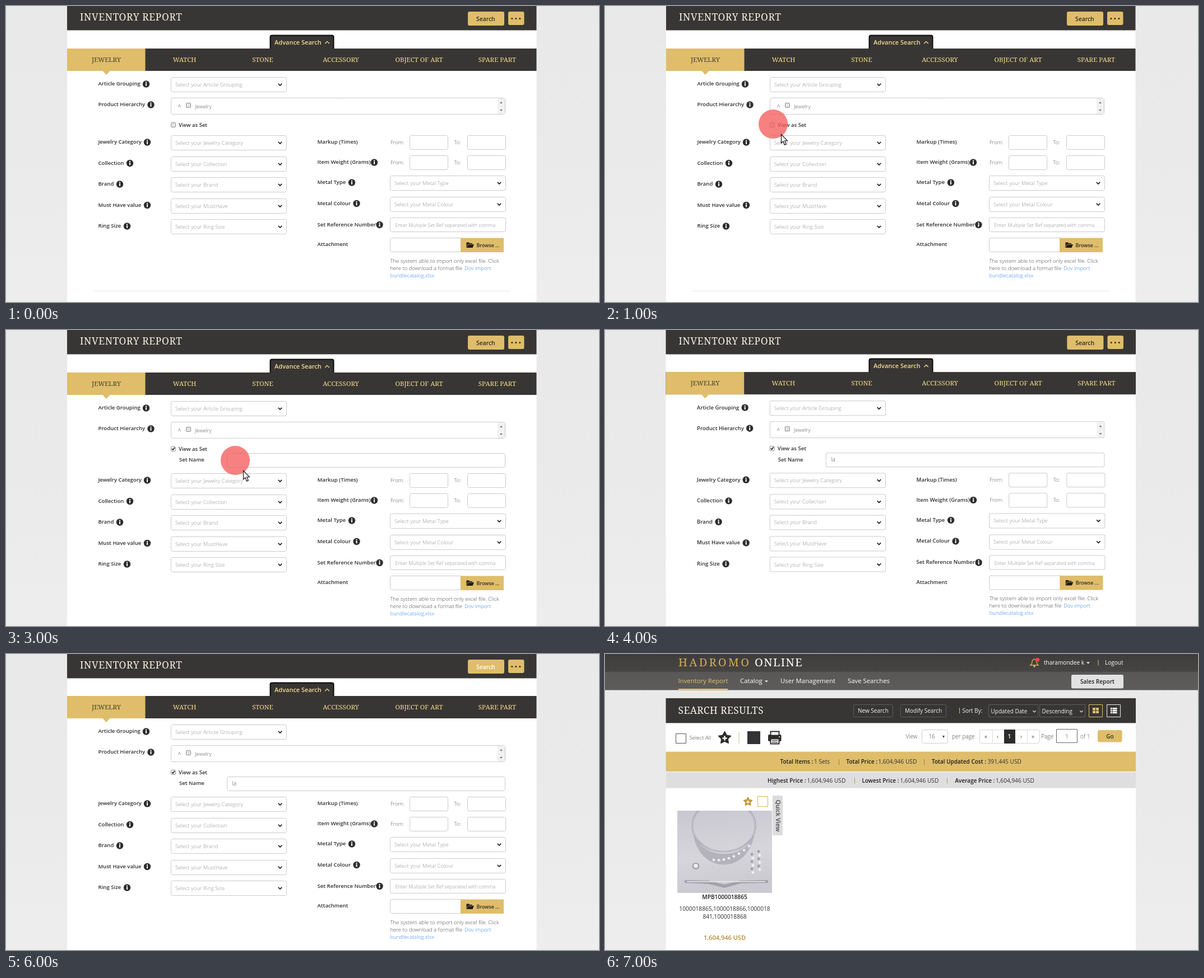
Animation of 1058x529 px, one loop 8000 ms. Source, as an HTML page with a canvas:

```html
<!DOCTYPE html>
<html lang="en">
<head>
<meta charset="utf-8">
<title>Inventory report</title>
<style>
html, body { margin: 0; width: 100%; height: 100%; overflow: hidden; background: #ebebeb; }
canvas { display: block; width: 1058px; height: 529px; }
</style>
</head>
<body>
<canvas id="stage" width="1058" height="529"></canvas>
<script>
const ctx = document.getElementById('stage').getContext('2d');
const W = 1058, H = 529, LOOP = 8000;
const GOLD = '#dfbd6a', DARK = '#383634', PALE = '#f8dc90', INK = '#2f2f2f';
const SANS = '"Open Sans", sans-serif', SERIF = '"Noto Serif", serif';

function rect(x, y, w, h, color) {
  ctx.fillStyle = color;
  ctx.fillRect(x, y, w, h);
}

function box(x, y, w, h, { fill, line, r = 0, lw = 1 }) {
  const inset = line ? .5 : 0;
  ctx.beginPath();
  ctx.roundRect(x + inset, y + inset, w - inset * 2, h - inset * 2, r);
  if (fill) { ctx.fillStyle = fill; ctx.fill(); }
  if (line) { ctx.strokeStyle = line; ctx.lineWidth = lw; ctx.stroke(); }
}

function text(str, x, y, { size = 9.6, weight = 400, color = INK, align = 'left', font = SANS, gap = 0 } = {}) {
  ctx.font = `${weight} ${size}px ${font}`;
  ctx.letterSpacing = gap + 'px';
  ctx.textAlign = align;
  ctx.fillStyle = color;
  ctx.fillText(str, x, y);
}

function disc(x, y, r, color) {
  ctx.fillStyle = color;
  ctx.beginPath();
  ctx.arc(x, y, r, 0, Math.PI * 2);
  ctx.fill();
}

function path(points, { fill, line, lw = 1, close = true }) {
  ctx.beginPath();
  points.forEach(([x, y]) => ctx.lineTo(x, y));
  if (close) ctx.closePath();
  if (fill) { ctx.fillStyle = fill; ctx.fill(); }
  if (line) { ctx.strokeStyle = line; ctx.lineWidth = lw; ctx.stroke(); }
}

function chevron(x, y, s, dir, color, lw = 1.6) {
  path([[x - s, y - dir * s / 2], [x, y + dir * s / 2], [x + s, y - dir * s / 2]], { line: color, lw, close: false });
}

function triangle(x, y, w, h, color) {
  path([[x - w, y], [x + w, y], [x, y + h]], { fill: color });
}

function star(x, y, r, color) {
  const pts = [];
  for (let i = 0; i < 10; i++) {
    const a = i * Math.PI / 5 - Math.PI / 2, d = i % 2 ? r * .52 : r;
    pts.push([x + d * Math.cos(a), y + d * Math.sin(a)]);
  }
  ctx.lineJoin = 'round';
  path(pts, { fill: color, line: color, lw: 1.5 });
  ctx.lineJoin = 'miter';
  const p = r * .36, t = r * .2;
  rect(x - p, y + .5 - t / 2, p * 2, t, '#fff');
  rect(x - t / 2, y + .5 - p, t, p * 2, '#fff');
}

function backdrop() {
  const g = ctx.createLinearGradient(0, 0, 0, H);
  g.addColorStop(0, '#e9e9e9');
  g.addColorStop(.5, '#eaeaea');
  g.addColorStop(1, '#ededed');
  rect(0, 0, W, H, g);
}

// ---- search form ----

function label(str, x, y, infoX) {
  text(str, x, y + 3.4, { weight: 600 });
  if (!infoX) return;
  disc(infoX, y + .5, 6.2, '#2f2e2d');
  rect(infoX - 1, y - .8, 2, 4.6, '#fff');
  disc(infoX, y - 2.5, 1.15, '#fff');
}

function field(x, y, w, h) {
  box(x, y, w, h, { fill: '#fff', line: '#cbcbcb', r: 3 });
}

function hint(str, x, y, size) {
  text(str, x, y, { weight: 300, color: '#8e8e8e', size });
}

function select(str, x, y) {
  field(x, y, 207, 27);
  hint(str, x + 8, y + 17);
  chevron(x + 195, y + 13.5, 3.2, 1, '#222', 1.8);
}

function checkbox(x, y, on) {
  box(x, y, 9, 9, { fill: on ? '#fff' : '#e4e4e4', line: '#8e8e8e', r: 1 });
  if (on) path([[x + 2, y + 4.3], [x + 3.8, y + 6.3], [x + 7, y + 2]], { line: '#222', lw: 1.6, close: false });
}

function header(hot) {
  rect(109, 0, 837.5, 43.4, DARK);
  text('INVENTORY REPORT', 132, 26, { size: 17.3, color: '#faf2e2', font: SERIF, gap: .7 });
  box(824, 10, 65, 25, { fill: GOLD, r: 3 });
  text('Search', 839, 26.6, { size: 10.35, weight: 600, color: hot ? '#fff' : '#2d2a26' });
  box(896, 10, 28.5, 24, { fill: GOLD, r: 3 });
  [902.8, 909.8, 916.8].forEach(x => disc(x, 22.5, 1.5, '#2d2a26'));
}

function tabs() {
  box(471, 52, 114, 30, { fill: DARK, line: '#0c0b0a', r: 3, lw: 2 });
  text('Advance Search', 479, 69, { size: 11, weight: 600, color: PALE });
  chevron(573, 65.3, 3.8, -1, PALE, 1.3);
  rect(109, 76, 837.5, 40, DARK);
  rect(109, 76, 139.5, 40, GOLD);
  triangle(179, 116, 6.5, 7, GOLD);
  ['JEWELRY', 'WATCH', 'STONE', 'ACCESSORY', 'OBJECT OF ART', 'SPARE PART'].forEach((name, i) =>
    text(name, 179 + i * 139.5, 100, { size: 11.5, color: i ? PALE : '#45402f', align: 'center', font: SERIF }));
}

function topFields(isSet, name) {
  label('Article Grouping', 164.5, 139, 250);
  select('Select your Article Grouping', 294, 127);
  label('Product Hierarchy', 164.5, 176, 258.5);
  field(294, 164, 597, 30);
  rect(877, 165, 13, 28, '#f1f1f1');
  triangle(883.5, 174, 2.5, -3, '#777');
  triangle(883.5, 185, 2.5, 3, '#777');
  text('^', 309.5, 183.5, { size: 10, color: '#777', align: 'center' });
  checkbox(321, 173);
  text('Jewelry', 337, 183, { weight: 300, color: '#555' });
  checkbox(294, 208, isSet);
  text('View as Set', 308, 216, { weight: 600, size: 9.5 });
  if (!isSet) return;
  label('Set Name', 309, 232);
  field(394, 220, 497, 26);
  text(name, 403.5, 236, { weight: 300, color: '#555', size: 10 });
}

function lowerFields() {
  const left = [['Jewelry Category', 252], ['Collection', 221], ['Brand', 203], ['Must Have value', 252], ['Ring Size', 216]];
  left.forEach(([name, info], i) => {
    const y = 231 + i * 37.5;
    label(name, 164.5, y + 12, info);
    select('Select your ' + (i === 3 ? 'MustHave' : name), 294, Math.round(y));
  });
  [['Markup (Times)', 231], ['Item Weight (Grams)', 267, 657]].forEach(([name, y, info]) => {
    const small = { weight: 300, size: 9.4, color: '#555' };
    label(name, 555.5, y + 12, info);
    text('From:', 686, y + 15.5, small);
    field(720, y, 69, 26);
    text('To:', 799.5, y + 15.5, small);
    field(823, y, 69, 26);
  });
  label('Metal Type', 555.5, 315, 617);
  select('Select your Metal Type', 685, 303);
  label('Metal Colour', 555.5, 352.5, 625.5);
  select('Select your Metal Colour', 685, 341);
  label('Set Reference Number', 555.5, 390.5, 666.5);
  field(685, 378, 207, 26);
  hint('Enter Multiple Set Ref separated with comma', 694.5, 395, 8.86);
  label('Attachment', 555.5, 426);
  field(685, 414, 130, 26);
  rect(811, 414.5, 77, 25.5, GOLD);
  path([[821.5, 432], [821.5, 422.5], [826, 422.5], [827.5, 424], [832, 424], [832, 426], [835, 426], [832.5, 432]], { fill: '#211d14' });
  path([[822.3, 430.5], [824.5, 426], [832, 426]], { line: GOLD, lw: .7, close: false });
  text('Browse ...', 839.5, 430.5, { weight: 600, size: 8.86, color: '#2d2a26' });
  const note = { weight: 300, size: 9.5, color: '#444' }, link = { ...note, color: '#2f82f0' };
  text('The system able to import only excel file. Click', 685.5, 458.5, note);
  text('here to download a format file ', 685.5, 471.5, note);
  text('Dov import', 818, 471.5, link);
  text('bundlecatalog.xlsx', 685.5, 484.5, link);
  rect(156, 509, 744, 1, '#e6e6e6');
}

function form({ isSet = false, name = '', rise = 0, zoom = 1, hot = false }) {
  ctx.save();
  ctx.translate(528, 0);
  ctx.scale(zoom, zoom);
  ctx.translate(-528, 0);
  rect(109, 0, 837.5, H, '#fff');
  header(hot);
  ctx.translate(0, -rise);
  tabs();
  topFields(isSet, name);
  ctx.translate(0, isSet ? 25 : 0);
  lowerFields();
  ctx.restore();
}

function pointer(x, y) {
  disc(x, y, 26, 'rgba(245,92,92,.77)');
  ctx.save();
  ctx.translate(x + 14.5, y + 18.5);
  path([[0, 0], [0, 15.5], [3.5, 12.3], [6, 18.6], [8.8, 17.4], [6.2, 11.4], [10.8, 11.2]],
    { fill: '#fff', line: '#111', lw: 1.2 });
  ctx.restore();
}

// ---- results page ----

function topBars() {
  const g = ctx.createLinearGradient(0, 0, 0, 64);
  g.addColorStop(0, '#3f3d3c');
  g.addColorStop(.49, '#474544');
  g.addColorStop(.5, '#595857');
  g.addColorStop(1, '#5d5c5b');
  rect(0, 0, W, 64.5, g);
  text('HADROMO', 131, 21.5, { size: 20, font: SERIF, color: '#d5ad58', gap: 3.4 });
  text('ONLINE', 267, 21.5, { size: 20, font: SERIF, color: '#fff', gap: 1.4 });

  path([[759, 20], [761.5, 17], [762.5, 11.5], [766, 9], [769.5, 11.5], [770.5, 17], [773, 20]], { line: '#d9b35c', lw: 1.3 });
  disc(766, 22, 1.8, '#d9b35c');
  disc(771.5, 10.5, 3.7, '#ee4444');
  text('tharamondee k', 783, 18.5, { size: 10.1, color: '#fff' });
  triangle(862, 14.5, 3, 3, '#fff');
  rect(879.5, 10.5, 1, 10, GOLD);
  text('Logout', 892, 18.5, { size: 10, color: '#fff' });

  const nav = { size: 11.35, color: '#fff' };
  text('Inventory Report', 130.5, 52, { ...nav, color: '#e3c06c' });
  rect(131, 62, 88, 2.5, '#e3c06c');
  text('Catalog', 241, 52, nav);
  triangle(288, 47.5, 3, 3, '#fff');
  text('User Management', 313, 52, nav);
  text('Save Searches', 433, 52, nav);
  box(832, 37, 93, 24.5, { fill: '#e2e2e2', r: 3 });
  text('Sales Report', 878.5, 53, { size: 10.2, weight: 600, align: 'center', color: '#222' });
}

function resultsHeader() {
  rect(108.5, 79, 838.5, 44.4, DARK);
  text('SEARCH RESULTS', 130.5, 107, { size: 17.3, font: SERIF, color: '#fbf7ef', gap: .5 });
  const white = { size: 10, color: '#f4f4f4' }, line = '#5e5b58';
  box(443, 90, 71, 23, { line, r: 2 });
  text('New Search', 451, 105, white);
  box(527, 90, 82, 23, { line, r: 2 });
  text('Modify Search', 535, 105, white);
  rect(632, 96, 1, 10, GOLD);
  text('Sort By:', 637.5, 105, white);
  [['Updated Date', 684, 89], ['Descending', 775, 82]].forEach(([str, x, w]) => {
    box(x, 90, w, 23, { line });
    text(str, x + 4.5, 106, white);
    chevron(x + w - 7, 102.5, 2.7, 1, '#eee', 1.2);
  });
  box(863, 90, 25, 23, { line: GOLD });
  for (const x of [870, 876]) for (const y of [96, 101.5]) rect(x, y, 5, 4.5, GOLD);
  box(895, 90, 25, 23, { line: '#eee' });
  for (const y of [96, 99.7, 103.4]) { rect(902, y, 2.5, 2.8, '#fff'); rect(905.5, y, 8, 2.8, '#fff'); }
}

function printer() {
  const ink = '#2e2c2b';
  box(291, 144, 23.5, 12, { fill: ink, r: 2 });
  box(295, 138, 16, 8, { fill: '#fff', line: ink, lw: 2 });
  box(295, 151, 16, 10, { fill: '#fff', line: ink, lw: 2 });
  rect(298, 154, 10, 1.2, ink);
  rect(298, 157, 10, 1.2, ink);
  disc(311, 148, 1, '#fff');
}

function toolbar() {
  const thin = { size: 10.2, weight: 300, color: '#444' }, mid = { ...thin, align: 'center' };
  box(126, 142, 19, 18, { line: '#555' });
  text('Select All', 150.5, 152.5, { ...thin, size: 9.7 });
  star(213.5, 150, 11.5, '#2e2c2b');
  rect(238.5, 139, 1, 21, GOLD);
  rect(254, 138, 23, 23, '#333');
  printer();
  text('View', 536.5, 151, thin);
  box(565, 135, 47, 25, { line: '#ccc', r: 3 });
  text('16', 583, 151, mid);
  triangle(604, 146, 2, 4, '#333');
  text('per page', 619, 151, thin);
  box(668, 135, 108, 25, { line: '#d5d5d5', r: 3 });
  rect(691, 135, 1, 25, '#ddd');
  rect(753, 135, 1, 25, '#ddd');
  rect(712, 135, 20, 25, '#2e2c2b');
  ['«', '‹', '1', '›', '»'].forEach((s, i) =>
    text(s, 679.5 + i * 21, 151, { size: 10.2, align: 'center', weight: i === 2 ? 600 : 400, color: i === 2 ? '#fff' : '#555' }));
  text('Page', 778, 151, thin);
  box(805, 134, 38, 25, { line: '#666' });
  text('1', 824, 150.5, mid);
  text('of 1', 848, 151, thin);
  box(879, 136, 43.5, 21.5, { fill: GOLD, r: 3 });
  text('Go', 901, 151, { size: 10, weight: 600, align: 'center' });
}

function totals() {
  const pair = (name, value, x, vx, y) => {
    text(name, x, y, { size: 10, weight: 600, color: '#1d1d1d' });
    text(value, vx, y, { size: 10.2, color: '#333' });
  };
  const price = '1,604,946 USD';
  rect(108.5, 174.6, 838.5, 35.4, GOLD);
  pair('Total Items :', '1 Sets', 312.5, 373, 196);
  pair('Total Price :', price, 430.5, 487.5, 196);
  pair('Total Updated Cost :', '391,445 USD', 583, 682.5, 196);
  rect(108.5, 211, 838.5, 28.6, '#dedede');
  pair('Highest Price :', price, 290, 360.5, 229.5);
  pair('Lowest Price :', price, 458.5, 526.5, 229.5);
  pair('Average Price :', price, 624.5, 697, 229.5);
  [417, 569].forEach(x => rect(x, 188, 1, 10, '#a5823a'));
  [445, 610].forEach(x => rect(x, 221.5, 1, 10, '#b99a56'));
}

function jewels() {
  ctx.save();
  ctx.beginPath();
  ctx.rect(129, 280, 169, 147);
  ctx.clip();
  const g = ctx.createLinearGradient(129, 280, 150, 427);
  g.addColorStop(0, '#c9c8d0');
  g.addColorStop(.6, '#d6d5db');
  g.addColorStop(1, '#cbcad1');
  rect(129, 280, 169, 147, g);
  const ring = (x, y, rx, ry, color, lw) => {
    ctx.beginPath();
    ctx.ellipse(x, y, rx, ry, 0, 0, Math.PI * 2);
    ctx.strokeStyle = color;
    ctx.lineWidth = lw;
    ctx.stroke();
  };
  ring(212, 307, 56, 46, '#94949c', 2.6);
  ring(212, 307, 56, 46, '#e6e6ea', 1);
  // crescent of the collar
  ctx.beginPath();
  ctx.moveTo(157, 318);
  ctx.bezierCurveTo(166, 396, 258, 396, 267, 318);
  ctx.bezierCurveTo(254, 370, 172, 370, 157, 318);
  ctx.fillStyle = '#b4b3bb';
  ctx.fill();
  for (let i = 0; i < 8; i++) disc(194 + i * 9, 368 - i * i * .65 + i, 2.4, '#ececf0');
  ring(162, 379, 5.5, 5, '#92929a', 1.6);
  disc(162, 378, 3, '#f1f1f4');
  [[262, 358], [274, 353]].forEach(([x, y]) => {
    for (let i = 0; i < 6; i++) disc(x + (i % 2) * 2, y + i * 6.5, 2.4, i % 2 ? '#f0f0f3' : '#a0a0a8');
  });
  path([[142, 404], [185, 405], [213, 412], [242, 405], [291, 404], [291, 409], [242, 410], [213, 418], [185, 411], [142, 409]], { fill: '#a3a2aa' });
  rect(146, 406, 140, 1.5, '#e9e9ed');
  ctx.restore();
}

function card() {
  star(255, 264, 8, '#c39a3f');
  box(272, 254, 19, 19, { line: '#d8b25a' });
  rect(299, 253, 18, 71, '#dcdcdc');
  ctx.save();
  ctx.translate(304.5, 289);
  ctx.rotate(Math.PI / 2);
  text('Quick View', 0, 0, { size: 10.8, weight: 600, align: 'center', color: '#444' });
  ctx.restore();
  jewels();
  const mid = { align: 'center', size: 10.2 };
  text('MPB1000018865', 213.5, 438, { ...mid, weight: 600, color: '#1d1d1d' });
  text('1000018865,1000018866,1000018', 213.5, 459, mid);
  text('841,1000018868', 213.5, 473, mid);
  text('1,604,946 USD', 213.5, 511, { align: 'center', size: 11, weight: 600, color: '#b38d3a' });
}

function results() {
  topBars();
  rect(108.5, 79, 838.5, 450, '#fff');
  resultsHeader();
  toolbar();
  totals();
  card();
}

// ---- timeline: one scene per second ----

const open = { isSet: true };
const typed = { isSet: true, name: 'la', rise: 1, zoom: 1.0012 };
const scenes = [
  () => form({}),
  () => { form({}); pointer(300, 211); },
  () => form(open),
  () => { form(open); pointer(409, 233); },
  () => form(typed),
  () => { form(typed); pointer(857, 25); },
  () => form({ ...typed, zoom: 1, hot: true }),
  results
];

const start = performance.now();
function tick() {
  const t = (performance.now() - start) % LOOP;
  backdrop();
  scenes[Math.floor(t / 1000)]();
  requestAnimationFrame(tick);
}
tick();
</script>
</body>
</html>
```
